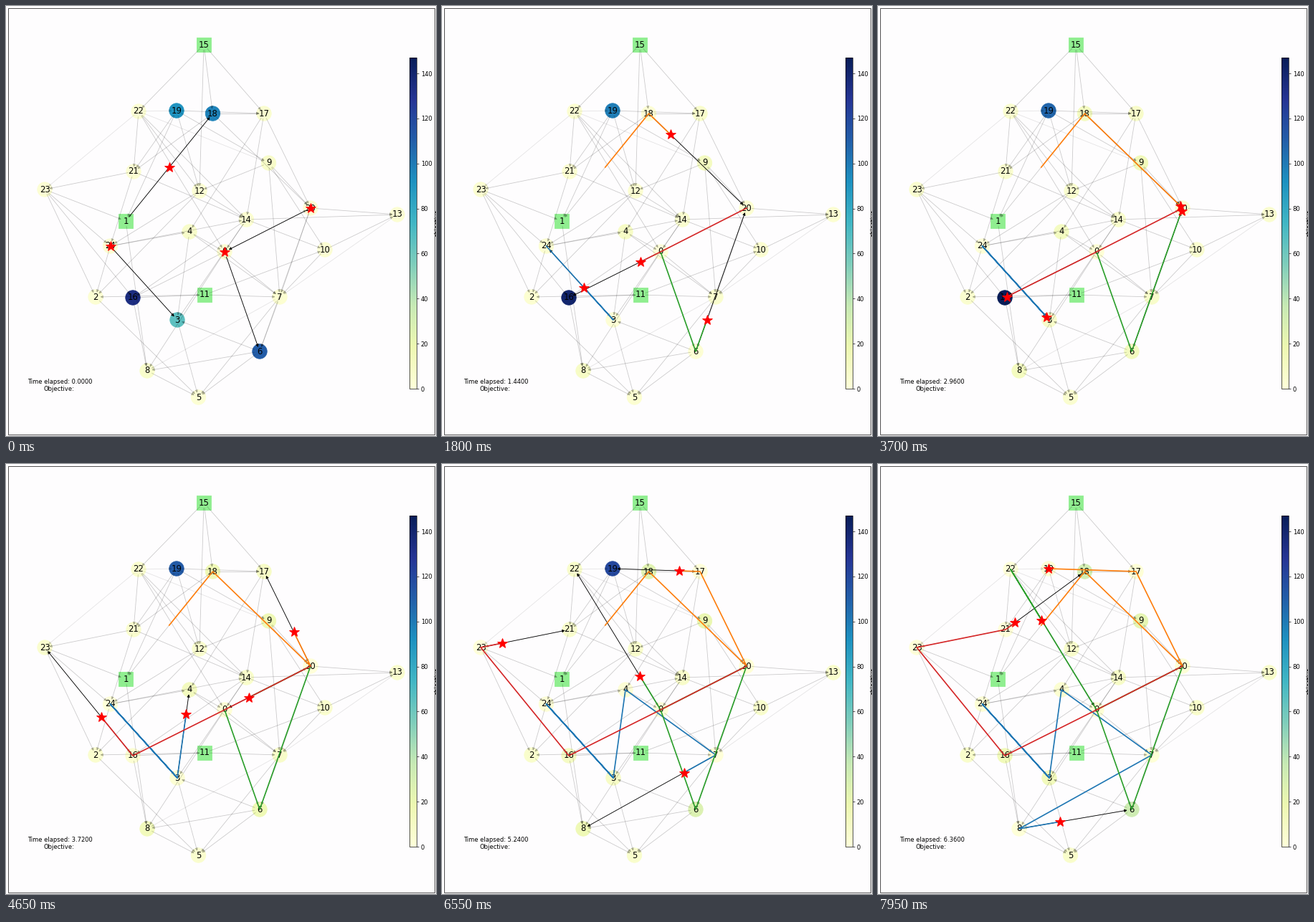
Write a matplotlib script that moves like this. It is 600 px wide and 600 px high and loops after 8000 ms.

```python
import numpy as np
import matplotlib.pyplot as plt
from matplotlib.animation import FuncAnimation
from matplotlib.cm import ScalarMappable
from matplotlib.collections import LineCollection, PolyCollection
from matplotlib.colors import Normalize
from matplotlib.patches import Rectangle

plt.rcParams["font.family"] = "DejaVu Sans"

FRAMES, STEP = 160, 0.04
PAPER = "#fefdfe"

POS = np.array([
    (305, 343), (167, 300), (125, 406), (239, 438), (256, 315),
    (268.5, 546), (354, 482), (382, 406), (197, 509), (366.5, 219),
    (445, 340), (277, 403), (270, 258), (546, 291), (335.5, 298),
    (276, 54), (177, 407), (360, 150), (288.5, 150), (238, 146),
    (425, 282), (178, 231), (185, 147), (54, 256), (145.5, 335)])
SQUARES = [1, 11, 15]
CIRCLES = [n for n in range(len(POS)) if n not in SQUARES]

# node: neighbours
LINKS = {
    15: (22, 17, 18, 12), 22: (21, 12, 0, 14), 19: (17, 9, 12, 21, 1),
    18: (17, 21, 1, 20), 17: (20, 14, 4), 9: (20, 12, 7, 10),
    12: (24, 2, 14), 21: (14, 23, 24), 23: (1, 24, 2, 16),
    24: (4, 14, 2, 3), 1: (8,), 16: (8, 11), 4: (0, 3, 7),
    14: (13, 0, 3, 10, 16), 0: (7, 6, 16, 20, 8), 11: (2, 7, 10),
    20: (13, 6, 7), 10: (13, 7), 7: (5, 6), 6: (8, 3, 5),
    8: (5,), 2: (5,), 3: (5,)}
FAINT = [(22, 19), (22, 23), (22, 9), (13, 7), (7, 8)]

# starting value and growth per time unit
LEVEL = {n: (3.0, 0.6) for n in CIRCLES}
LEVEL.update({
    19: (91, 5.6), 18: (97, 5.8), 6: (111, 6.3), 16: (134, 4.4),
    3: (65, 4.0), 9: (8, 2.3), 8: (6, 2.0), 4: (7, 1.5),
    17: (5, 1.0), 14: (4, 0.7), 7: (4, 1.0)})

# colour, first node, share of the first edge already done, (next node, duration)
ROUTES = [
    ("C0", 24, 0, [(3, 1), (24, 1), (3, 1), (4, 1), (7, 1), (8, 1), (6, 1)]),
    ("C1", 1, 0.5, [(18, 1), (20, 2), (17, 2), (19, 1), (19, 1)]),
    ("C2", 0, 0, [(6, 1), (20, 2), (0, 1), (0, 1), (22, 1), (0, 1)]),
    ("C3", 20, 0, [(0, 1), (16, 2), (23, 2), (21, 1), (18, 3)]),
]


def arrow(a, b, gap=7.2, length=3.3, half=1.7):
    """Shortened line from a to b and the head at b."""
    u = (b - a) / np.hypot(*(b - a))
    side = np.array([-u[1], u[0]])
    tail, tip = a + gap * u, b - gap * u
    base = tip - length * u
    return (tail, tip), (tip, base + half * side, base - half * side)


def add_arrows(pairs, color, alpha, z):
    parts = [arrow(POS[a], POS[b]) for a, b in pairs]
    lines = LineCollection([p[0] for p in parts], colors=color, alpha=alpha,
                           linewidths=1, zorder=z)
    heads = PolyCollection([p[1] for p in parts], facecolors=color,
                           edgecolors=color, alpha=alpha, linewidths=0.8,
                           zorder=z)
    ax.add_collection(lines)
    ax.add_collection(heads)
    return lines, heads


def travel(route, t):
    """Trail so far and the current edge at time t."""
    _, node, share, legs = route
    start = POS[node] + share * (POS[legs[0][0]] - POS[node])
    trail, begin = [start], 0
    for goal, span in legs:
        if t < begin + span - 1e-6:
            part = (t - begin) / span
            trail.append(start + part * (POS[goal] - start))
            return np.array(trail), (node, goal)
        node, start, begin = goal, POS[goal], begin + span
        trail.append(start)
    return np.array(trail), (node, node)


def arrivals():
    visits = {n: [] for n in CIRCLES}
    for _, _, _, legs in ROUTES:
        t, last = 0, None
        for goal, span in legs:
            t += span
            if goal != last:
                visits[goal].append(t)
            last = goal
    return visits


VISITS = arrivals()


def level(n, t):
    first, rate = LEVEL[n]
    past = [v for v in VISITS[n] if v <= t + 1e-6]
    return rate * (t - max(past)) if past else first + rate * t


fig = plt.figure(figsize=(10, 10), dpi=60, facecolor=PAPER)
ax = fig.add_axes([0, 0, 1, 1])
ax.set(xlim=(0, 600), ylim=(600, 0))
ax.axis("off")
ax.add_patch(Rectangle((2.5, 2.5), 595.5, 595.5, fill=False, lw=0.8))

norm = Normalize(0, 147)
bar_ax = fig.add_axes([563 / 600, 0.11, 10 / 600, 0.77])
fig.colorbar(ScalarMappable(norm, "YlGnBu"), cax=bar_ax, label="objective")

ax.scatter(*POS[SQUARES].T, s=600, marker="s", c="lightgreen", lw=1, zorder=2)
discs = ax.scatter(*POS[CIRCLES].T, s=600, c=np.zeros(len(CIRCLES)),
                   cmap="YlGnBu", norm=norm, lw=1, zorder=2)
edges = [(a, b) for a, ends in LINKS.items() for b in ends]
add_arrows(edges, "black", 0.2, 3)
add_arrows(FAINT, "black", 0.1, 3)
shafts, tips = add_arrows(edges[:1], "black", 1, 4)

for n, (x, y) in enumerate(POS):
    ax.text(x, y, str(n), size=14, ha="center", va="center", zorder=5)

trails = [ax.plot([], [], color=r[0], lw=2, zorder=6)[0] for r in ROUTES]
stars, = ax.plot([], [], "r*", ms=18, mew=1, ls="none", zorder=7)
clock = ax.text(75, 527, "", size=10, ha="center", va="baseline")
ax.text(74, 536.7, "Objective:", size=10, ha="center", va="baseline")


def update(i):
    t = i * STEP
    discs.set_array(np.array([level(n, t) for n in CIRCLES]))
    heads, active = [], []
    for route, line in zip(ROUTES, trails):
        path, (a, b) = travel(route, t)
        line.set_data(path.T)
        heads.append(path[-1])
        if a != b:
            active.append(arrow(POS[a], POS[b]))
    shafts.set_segments([p[0] for p in active])
    tips.set_verts([p[1] for p in active])
    stars.set_data(np.array(heads).T)
    clock.set_text(f"Time elapsed: {t:.4f}")


anim = FuncAnimation(fig, update, frames=FRAMES, interval=50,
                     init_func=lambda: update(0), repeat=True, repeat_delay=0)
plt.show()
```
